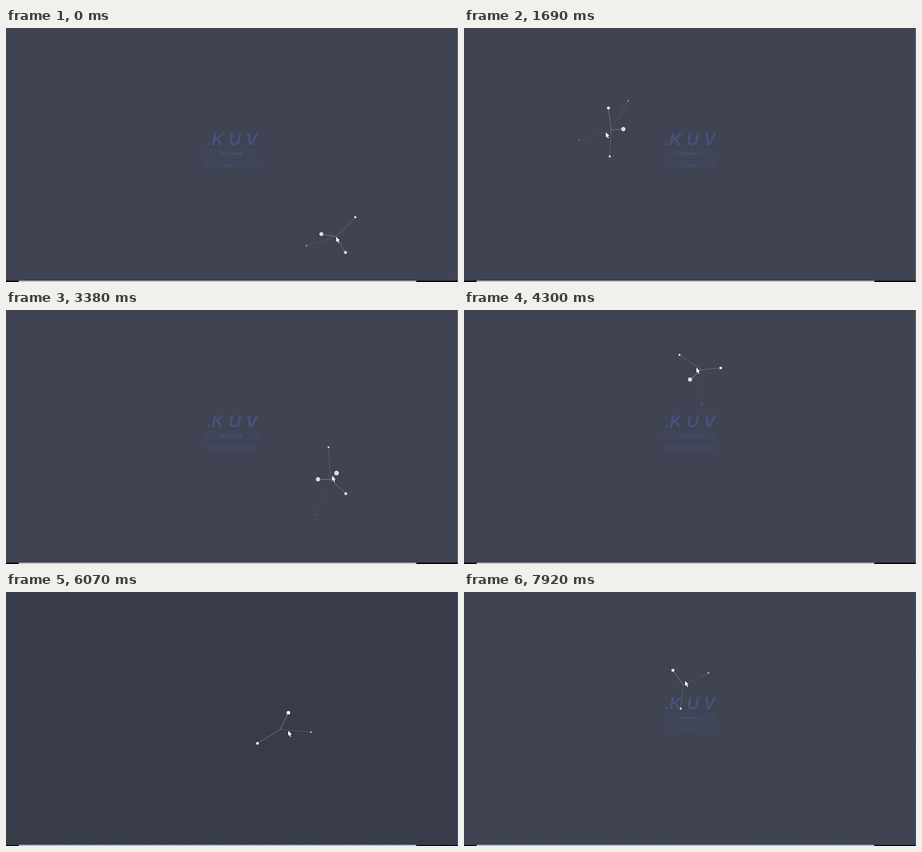
These frames come from a looping animation (998 by 561 pixels, 7.99 s). An HTML page with a canvas:

```html
<!DOCTYPE html>
<html lang="en">
<head>
<meta charset="utf-8">
<style>
  html, body { margin: 0; width: 100%; height: 100%; overflow: hidden; background: #3f4352; }
  canvas { display: block; }
</style>
</head>
<body>
<canvas id="stage" width="998" height="561"></canvas>
<script>
const ctx = document.getElementById('stage').getContext('2d');
const W = 998, H = 561;
const LOOP = 7990, HOLD = 150, STEP = 76.93;
const HUB_LAG = 50, SPAWN_GAP = 185, LIFE = 900, MAX_R = 5.2;
const FONT = '"Liberation Sans", Arial, sans-serif';

// Turning points of the pointer: time, x, y
const path = [
  [150, 729, 461], [920, 595, 245], [1690, 313, 230], [2200, 350, 385],
  [2620, 465, 430], [3380, 720, 366], [4300, 514, 127], [5000, 390, 220],
  [5380, 478, 284], [5650, 482, 286], [6350, 680, 330], [6840, 517, 422],
  [7150, 430, 345], [7920, 488, 196]
];

const clamp = v => Math.max(0, Math.min(1, v));
const mix = (a, b, k) => a + (b - a) * k;
const blend = (a, b, k) => `rgb(${a.map((v, i) => Math.round(mix(v, b[i], k)))})`;

// Smooth curve through the turning points
function pointerAt(t) {
  const last = path.length - 1;
  let i = 0;
  while (i < last - 1 && t >= path[i + 1][0]) i++;
  const a = path[Math.max(0, i - 1)], b = path[i];
  const c = path[i + 1], d = path[Math.min(last, i + 2)];
  const span = c[0] - b[0], k = clamp((t - b[0]) / span);
  const k2 = k * k, k3 = k2 * k;
  return [1, 2].map(n => {
    const out = (c[n] - a[n]) / (c[0] - a[0]) * span;
    const into = (d[n] - b[n]) / (d[0] - b[0]) * span;
    return (2 * k3 - 3 * k2 + 1) * b[n] + (k3 - 2 * k2 + k) * out
      + (3 * k2 - 2 * k3) * c[n] + (k3 - k2) * into;
  });
}

let seed = 29;
function random() {
  seed = (seed * 16807) % 2147483647;
  return seed / 2147483647;
}

// A steady stream of dots, fanned out by the golden angle
const particles = [];
for (let birth = -LIFE; birth < LOOP; birth += SPAWN_GAP) {
  particles.push({
    birth: birth + random() * SPAWN_GAP,
    angle: particles.length * 2.4 + random(),
    reach: mix(.85, 1.15, random())
  });
}

function drawParticles(t, menu) {
  const [hx, hy] = pointerAt(t - HUB_LAG);
  const tint = blend([255, 255, 255], [218, 220, 226], menu);
  ctx.strokeStyle = ctx.fillStyle = tint;
  for (const { birth, angle, reach } of particles) {
    const age = (t - birth) / LIFE;
    if (age < 0 || age >= 1) continue;
    const distance = (22 + 68 * age) * reach, r = MAX_R * (1 - age);
    const x = hx + Math.cos(angle) * distance, y = hy + Math.sin(angle) * distance;
    ctx.globalAlpha = Math.min(.36, .02 + r * .09);
    ctx.lineWidth = .8 + r * .15;
    ctx.beginPath();
    ctx.moveTo(hx, hy);
    ctx.lineTo(x, y);
    ctx.stroke();
    ctx.globalAlpha = clamp(r * 1.4);
    ctx.beginPath();
    ctx.arc(x, y, r, 0, Math.PI * 2);
    ctx.fill();
  }
  ctx.globalAlpha = 1;
}

function label(text, x, y, size, color, spacing) {
  ctx.font = `italic bold ${size}px ${FONT}`;
  ctx.letterSpacing = spacing + 'px';
  ctx.fillStyle = color;
  ctx.fillText(text, x, y);
}

function drawMenu(alpha) {
  ctx.globalAlpha = alpha;
  ctx.fillStyle = '#414559';
  for (const y of [266.5, 292.5]) {
    ctx.beginPath();
    ctx.roundRect(436, y, 122, 21, 3);
    ctx.fill();
  }
  label('.K U V', 443, 259, 38, '#455279', 0);
  label('RESUME', 475.5, 279.5, 7, '#4e5a83', 3.1);
  label('EXIT', 485.5, 305.5, 7, '#4e5a83', 3.1);
  ctx.globalAlpha = 1;
}

function drawEdges(focused) {
  ctx.fillStyle = '#050608';
  ctx.fillRect(0, 558, W, 3);
  ctx.fillStyle = focused ? '#b9c3d2' : '#bfc1c3';
  ctx.fillRect(28, 558, 878, 3);
  ctx.fillStyle = focused ? '#405468' : '#858992';
  ctx.fillRect(W - 1, 0, 1, H);
  if (!focused) return;
  ctx.fillStyle = '#2f7fb8';
  for (let x = 0; x < W; x += 4) ctx.fillRect(x, 558, 2, 1);
  for (let y = 0; y < 558; y += 4) ctx.fillRect(W - 1, y, 1, 2);
}

const arrow = new Path2D('M0 0V11.8L2.7 9.4L4.9 14.3L6.9 13.4L4.8 8.6H8.5Z');
function drawPointer(t) {
  const [x, y] = pointerAt(t).map(Math.round);
  ctx.save();
  ctx.translate(x, y);
  ctx.lineWidth = 1.1;
  ctx.strokeStyle = '#15161c';
  ctx.stroke(arrow);
  ctx.fillStyle = '#fff';
  ctx.fill(arrow);
  ctx.restore();
}

function draw(now) {
  const clock = now % LOOP;
  const step = Math.floor((clock - HOLD + 8) / STEP);
  const t = step < 0 ? 0 : HOLD + step * STEP;
  const menu = t < 6500 ? 1 - clamp((t - 5450) / 350) : clamp((t - 7450) / 460);
  ctx.fillStyle = blend([56, 60, 74], [63, 67, 82], menu);
  ctx.fillRect(0, 0, W, H);
  drawParticles(t, menu);
  drawMenu(menu);
  drawEdges(t > 5500);
  drawPointer(t);
}

const start = performance.now();
function tick() {
  draw(performance.now() - start);
  requestAnimationFrame(tick);
}
tick();
</script>
</body>
</html>
```
